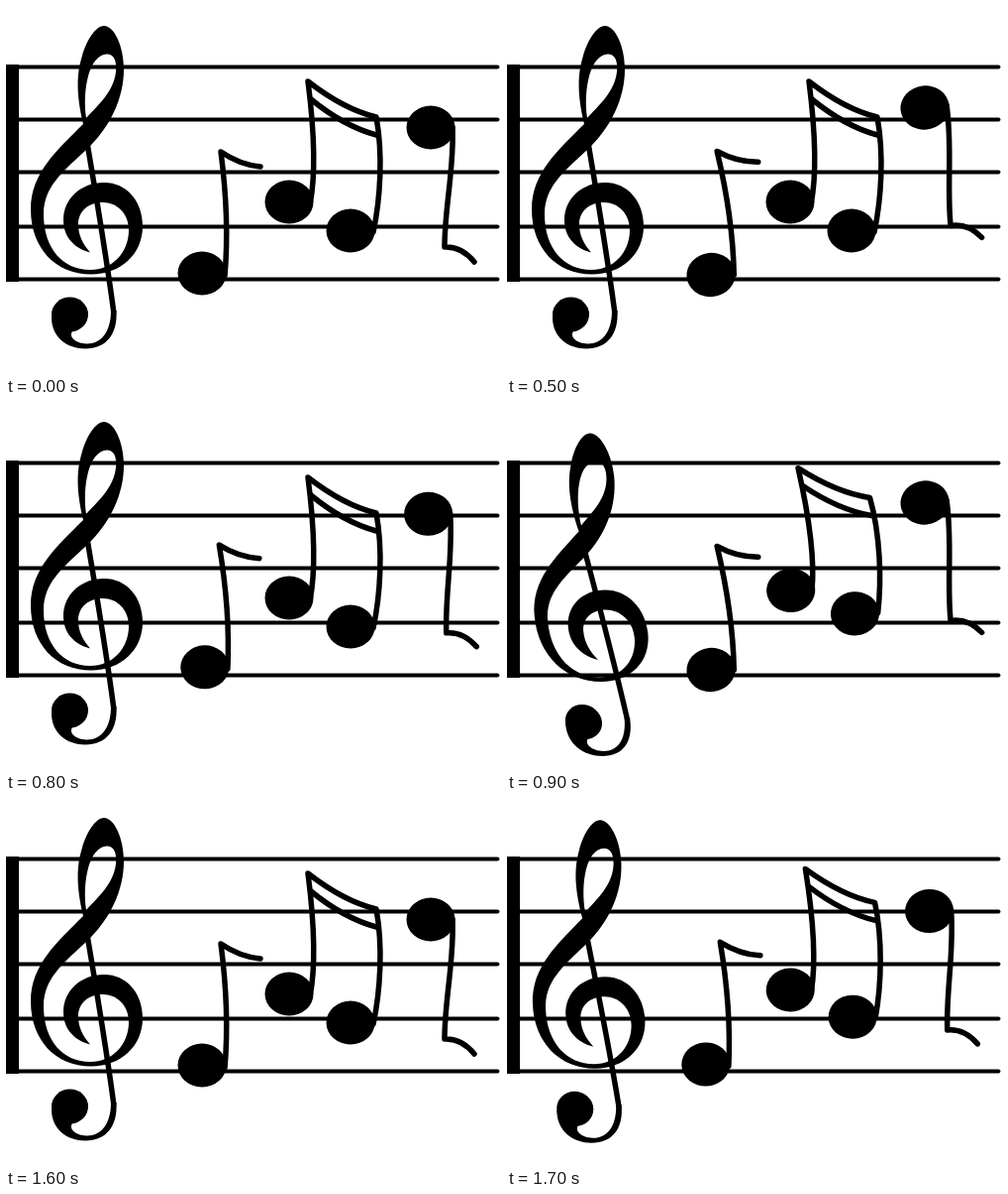
An HTML page with a canvas for the animation above (1.9 s loop, 500 by 371 pixels).

```html
<!DOCTYPE html>
<html lang="en">
<head>
<meta charset="utf-8">
<title>Dancing notes</title>
<style>
  html, body { margin: 0; width: 100%; height: 100%; overflow: hidden; background: #fff; }
  canvas { display: block; }
</style>
</head>
<body>
<canvas id="stage" width="500" height="371"></canvas>
<script>
const ctx = document.getElementById('stage').getContext('2d');
const LOOP = 1900;

// Each part: fills, strokes, heads, and how a full sway moves it:
// x shifts by sx * (y - y0), y shifts by dy + sy * (x - x0).
const clef = {
  fills: [
    `M78 119 C70 85 72 66 77 50 C81 36 90 20 99 20 C109 20 119 40 119 64
     C119 92 106 122 80 146 C56 168 38 183 38 210 C38 245 58 266 85 266
     C108 266 124 248 124 226 C124 209 112 198 98 198 C82 198 73 208 73 220
     C73 232 78 240 85 248.5 C68 244 58 232 58 216 C58 194 76 178 99 178
     C122 178 138 197 138 222 C138 250 116 270.5 86 270.5
     C50 270.5 25 244 25 205 C25 168 52 145 78 119 Z
     M81 113 C77 84 84 49 102 48.5 C110 48 112 58 111 66 C109 86 93 100 81 113 Z`,
    `M46 312 C45 334 62 345.5 80 345.5 C101 345.5 113 331 111.5 307 L106 307
     C106 329 96 341 81 340.5 C71 340 63 334 67 328 Z`
  ],
  strokes: ['M82 138 C90 185 103 265 108.7 308'],
  heads: [[64.5, 311, 18.5, 17.5]],
  sway: { sx: 0.096, y0: 176, dy: 11.5, sy: 0, x0: 0 }
};

const single = {
  strokes: ['M221 272 C225 225 222 185 217 147 Q236 160 257 162'],
  heads: [[198, 269.5, 24.5, 22]],
  sway: { sx: 0.105, y0: 193, dy: 1.5, sy: -0.105, x0: 198 }
};

const pair = {
  strokes: [
    'M307 200 C314 165 310 115 305 76 Q341 104 374 112 C381 150 378 195 371 228',
    'M308 94 Q341 121 374 130'
  ],
  heads: [[286, 197.5, 24.5, 22], [348, 226.5, 24.5, 22]],
  sway: { sx: 0.096, y0: 190, dy: -7.6, sy: -0.09, x0: 286 }
};

const hanging = {
  strokes: ['M451 122 C453 163 443 203 443 243 Q460 242 473 258'],
  heads: [[429, 122.5, 24.5, 22]],
  sway: { sx: 0.1, y0: 192, dy: -20, sy: -0.105, x0: 429 }
};

for (const part of [clef, single, pair, hanging]) {
  part.fills = (part.fills || []).map(d => new Path2D(d));
  part.strokes = part.strokes.map(d => new Path2D(d));
}

// start time, [sway, drop] of clef and pair, [sway, drop] of the other notes, clef stretch
const poses = [
  [0, [0, 0], [0, 0], 1],
  [500, [0, 0], [1, 0], 1],
  [600, [0, 0], [0, 0], 1.03],
  [800, [0, 0], [0.35, -2.7], 1],
  [900, [1, 0], [1, -1], 1],
  [1400, [0, 2.8], [0, 2.8], 1],
  [1600, [0, 0], [0, 0], 1],
  [1700, [0.33, -1.5], [0.35, -1.5], 1]
];

function drawStaff() {
  ctx.fillRect(0, 59, 13, 219);
  ctx.lineWidth = 4;
  for (const y of [61.5, 114.5, 167.5, 222.5, 275.5]) {
    ctx.beginPath();
    ctx.moveTo(0, y);
    ctx.lineTo(496.5, y);
    ctx.stroke();
  }
}

function drawPart(part, [k, drop], stretch = 1) {
  const { sx, y0, dy, sy, x0 } = part.sway;
  ctx.save();
  ctx.transform(1, k * sy, k * sx, 1, -k * sx * y0, k * (dy - sy * x0) + drop);
  ctx.transform(1, 0, 0, stretch, 0, 182.5 * (1 - stretch));
  ctx.lineWidth = 5.5;
  part.fills.forEach(p => ctx.fill(p, 'evenodd'));
  part.strokes.forEach(p => ctx.stroke(p));
  for (const [x, y, rx, ry] of part.heads) {
    ctx.beginPath();
    ctx.ellipse(x, y, rx, ry, 0, 0, Math.PI * 2);
    ctx.fill();
  }
  ctx.restore();
}

function draw(t) {
  const [, main, notes, stretch] = poses.findLast(p => p[0] <= t);
  ctx.fillStyle = '#fff';
  ctx.fillRect(0, 0, 500, 371);
  ctx.fillStyle = ctx.strokeStyle = '#000';
  ctx.lineCap = ctx.lineJoin = 'round';
  drawStaff();
  drawPart(clef, main, stretch);
  drawPart(pair, main);
  drawPart(single, notes);
  drawPart(hanging, notes);
}

const start = performance.now();
function tick() {
  draw((performance.now() - start) % LOOP);
  requestAnimationFrame(tick);
}
tick();
</script>
</body>
</html>
```
